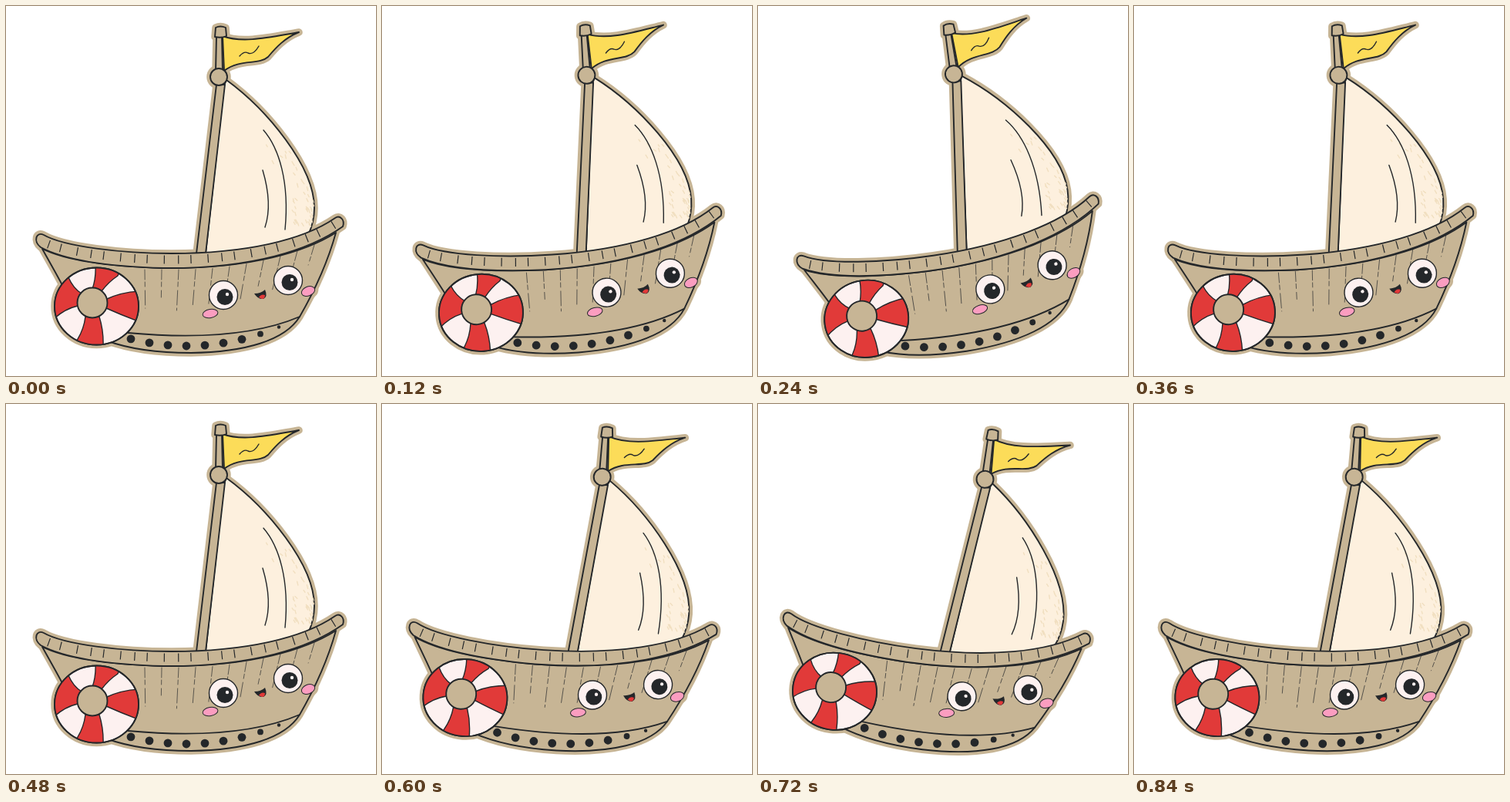
An HTML page that plays this animation: 480 px wide and 480 px high, repeating every 0.96 s.

```html
<!DOCTYPE html>
<html lang="en">
<head>
<meta charset="utf-8">
<title>Rocking boat</title>
<style>
  html, body { margin: 0; width: 100%; height: 100%; overflow: hidden; background: #fff; }
  svg { display: block; width: 100%; height: 100%; }
  g { stroke-linecap: round; stroke-linejoin: round; }
  .halo { fill: #c7b595; stroke: #c7b595; stroke-width: 9.5; }
  .ink { fill: none; stroke: #24272a; stroke-width: 1.9; }
  .wood { fill: #c7b595; }
  .sail { fill: #fdf0de; }
  .flag { fill: #fcdc59; }
  .cream { fill: #fdf1f0; }
  .red { fill: #e13a39; }
  .pink { fill: #fb9dc0; stroke-width: 1; }
  .dark { fill: #24272a; stroke: none; }
  .thin { stroke-width: 1.4; }
  .grain { stroke-width: .9; stroke-dasharray: 13 3 6 5 19 4 3 6; opacity: .75; }
  .ticks { stroke-width: 11; stroke-linecap: butt; stroke-dasharray: 1.2 15 1.2 21 1.2 17; }
  .worn { stroke: #f1dfc0; stroke-width: 1.4; }
</style>
</head>
<body>
<svg viewBox="0 0 480 480">
  <defs>
    <path id="pole" d="M273 39L272 84H281L280 39Z"/>
    <path id="cap" d="M272 28Q278 25 285 28L286 39Q279 42 271 40Z"/>
    <path id="mast" d="M273 102L247 321H259L284 102Z"/>
    <circle id="ball" cx="276" cy="92" r="11"/>
    <path id="flag" d="M281 39C308 49 344 40 380 34C362 41 350 54 340 66C328 77 304 68 283 84Z"/>
    <path id="sail" d="M286 96C338 134 400 208 400 262Q400 280 392 297Q335 318 259 321L283 103Z"/>
    <path id="body" d="M47 315C58 335 70 355 85 385L130 434C165 447 205 450 240 450C310 449 362 434 381 403C400 370 418 330 428 294C390 318 320 341 205 340C130 338 75 329 47 315Z"/>
    <path id="rim" d="M49 297C75 312 150 321 215 321C310 321 385 304 427 275C433 271 440 277 437 286C395 316 320 341 205 340C130 338 75 329 45 313C35 305 39 292 49 297Z"/>
    <ellipse id="ring" cx="117.500" cy="389.500" rx="54.500" ry="50"/>
    <ellipse id="cheek" cx="392" cy="370" rx="9" ry="6" transform="rotate(-22 392 370)"/>
    <clipPath id="ringClip"><use href="#ring"/></clipPath>
    <clipPath id="sailClip"><use href="#sail"/></clipPath>
    <g id="eye">
      <circle class="cream" r="18.500"/>
      <circle class="dark" cx="2" cy="2.500" r="10.500"/>
      <circle class="cream" cx="5" cy="-1" r="2.200" stroke="none"/>
    </g>
  </defs>

  <g id="boat">
    <g class="halo">
      <use href="#pole"/><use href="#cap"/><use href="#mast"/><use href="#ball"/>
      <use href="#flag"/><use href="#sail"/><use href="#body"/><use href="#rim"/>
      <use href="#ring"/><use href="#cheek"/>
    </g>

    <g class="ink">
      <use href="#flag" class="flag"/>
      <path d="M303 65Q309 58 314 61Q321 64 328 52" class="thin"/>
      <use href="#sail" class="sail"/>
      <path id="worn" class="worn" clip-path="url(#sailClip)"/>
      <path class="thin" d="M334 161C354 184 368 228 362 290M333 213C341 240 343 266 336 287"/>
      <use href="#mast" class="wood"/>
      <use href="#pole" class="wood"/>
      <use href="#cap" class="wood"/>
      <use href="#ball" class="wood"/>

      <use href="#body" class="wood"/>
      <path d="M158 424C235 431 318 430 381 403"/>
      <path id="planks" class="grain"/>
      <use href="#rim" class="wood"/>
      <path class="ticks" d="M55 309C85 320 150 329 215 329C310 329 385 310 428 282"/>
      <g id="portholes" class="dark"></g>

      <use href="#ring" class="cream"/>
      <g class="red thin" clip-path="url(#ringClip)">
        <path d="M112 367Q117 353 116 336H151L145 350Q133 358 124 370Z"/>
        <path d="M131 380Q150 371 174 370V410Q150 401 130 392Z"/>
        <path d="M121 403Q127 422 126 444H88L93 432Q101 419 103 403Z"/>
        <path d="M93 389Q76 393 62 406V362L81 352Q87 366 98 373Z"/>
      </g>
      <use href="#ring"/>
      <circle class="wood" cx="112" cy="385" r="19.500"/>

      <use href="#eye" x="282" y="375" class="thin"/>
      <use href="#eye" x="366" y="356" class="thin"/>
      <path class="dark" d="M322 373Q331 373 336 368Q340 377 334 380Q327 381 322 373Z"/>
      <path class="red" d="M328 378Q331 373 336 375Q336 380 332 380Z" stroke="none"/>
      <use href="#cheek" class="pink"/>
      <ellipse class="pink" cx="265" cy="399" rx="10" ry="5.500" transform="rotate(-10 265 399)"/>
    </g>
  </g>
</svg>
<script>
  const el = id => document.getElementById(id);
  const times = (count, make) => Array.from({ length: count }, (_, i) => make(i)).join('');

  let seed = 7;
  const random = () => (seed = seed * 16807 % 2147483647) / 2147483647;

  // Dry-brush flecks gather along the sail's outer edge.
  el('worn').setAttribute('d', times(45, () => {
    const y = 180 + 110 * random();
    const x = 398 - (y < 250 ? (250 - y) * .5 : 0) - 30 * random() ** 2;
    return `M${x} ${y}l${1 + 2 * random()} ${2 + 3 * random()}`;
  }));

  // Plank seams fan inwards towards the keel.
  el('planks').setAttribute('d', times(11, i => {
    const x = 180 + 22 * i;
    const top = 342 - Math.max(0, x - 230) ** 2 / 900;
    const length = (30 + 45 * random()) * (1 - i / 25);
    return `M${x} ${top}l${(190 - x) / 700 * length} ${length}`;
  }));

  el('portholes').innerHTML = times(9, i => {
    const x = 162 + 24 * i;
    const y = 441 - (x - 235) ** 2 / 580;
    return `<circle cx="${x}" cy="${y}" r="${Math.min(5.4, (9.3 - i) * 1.7)}"/>`;
  });

  const STEP = 120;

  // Stepped swing 0, -1, -2, -1, 0, 1, 2, 1, leaning slightly further to the left.
  function tilt(ms) {
    const step = Math.floor(ms / STEP) % 8;
    const swing = Math.abs((step + 6) % 8 - 4) - 2;
    return -3.93 * swing - .14 * swing ** 2;
  }

  function draw() {
    el('boat').setAttribute('transform', `rotate(${tilt(performance.now())} 240 240)`);
    requestAnimationFrame(draw);
  }
  draw();
</script>
</body>
</html>
```
